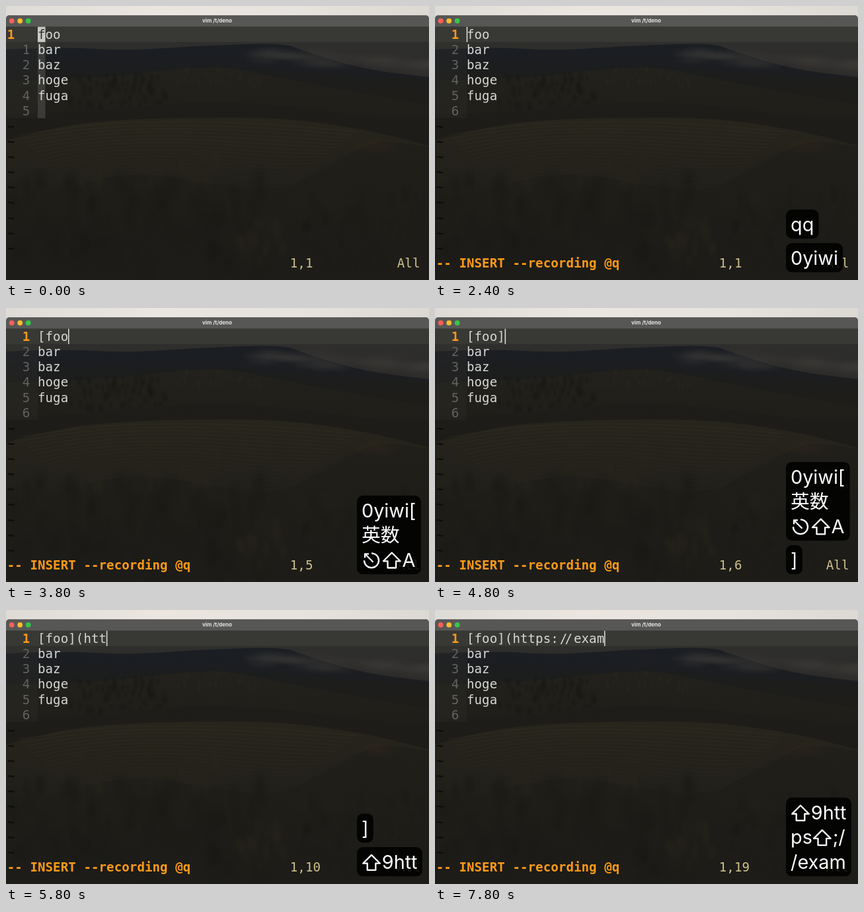
Animation, 640 px wide and 416 px high, one loop 8000 ms. Source, as an HTML page with a canvas:

```html
<!DOCTYPE html>
<html lang="en">
<head>
<meta charset="utf-8">
<title>Macro recording</title>
<style>
html, body { margin: 0; width: 100%; height: 100%; overflow: hidden; background: #20201c; }
canvas { display: block; width: 100%; height: 100%; }
</style>
</head>
<body>
<canvas id="stage" width="640" height="416"></canvas>
<script>
const W = 640, H = 416, LOOP = 8000, STEP = 200;
const ctx = document.getElementById('stage').getContext('2d');

const MONO = '"DejaVu Sans Mono", monospace';
const SANS = 'Inter, "Noto Sans CJK JP", "Noto Sans CJK", sans-serif';
const ORANGE = '#fd9a18', TEXT = '#d6d6d4', DIM = '#62625f', TAN = '#cfc08c';
const CELL = 11.57, ROW = 23.13;
const colX = c => 1.7 + c * CELL;
const rowY = r => 31.6 + r * ROW;

// [time, mode, status, first line, cursor column]
const states = [
  [0, 'n', '', 'foo', 0],
  [1000, 'n', 'recording @q', 'foo', 0],
  [2400, 'i', '', 'foo', 0],
  [2600, 'i', '', '[foo', 1],
  [3200, 'n', 'recording @q', '[foo', 0],
  [3800, 'i', '', '[foo', 4]
];
// characters typed at the end of the line
const typed = [[4600, ']'], [5000, '('], [5400, 'h'], [5600, 't'], [5800, 't'], [6000, 'p'],
  [6200, 's'], [6600, ':'], [6800, '/'], [7200, '/'], [7400, 'e'], [7600, 'xa'], [7800, 'm']];

// key groups in the overlay
const groups = [
  { fade: 2490, keys: [[200, 'q'], [1000, 'q']] },
  { fade: 5290, keys: [[1600, '0'], [1800, 'yi'], [2000, 'w'], [2400, 'i'], [2600, '['],
    [3000, '\n英数'], [3200, '⎋'], [3600, '⇧'], [3800, 'A']] },
  { fade: 5890, keys: [[4600, ']']] },
  { fade: Infinity, keys: [[5000, '⇧9'], [5400, 'h'], [5600, 't'], [5800, 't'], [6000, '\np'],
    [6200, 's'], [6600, '⇧;'], [6800, '/'], [7200, '\n/'], [7400, 'e'], [7600, 'xa'], [7800, 'm']] }
];

const upTo = (list, t) => list.filter(k => k[0] <= t).map(k => k[1]).join('');

function random(seed) {
  return () => (seed = (seed * 16807) % 2147483647) / 2147483647;
}

function box(c, x, y, w, h, r, fill) {
  c.fillStyle = fill;
  c.beginPath();
  c.roundRect(x, y, w, h, r);
  c.fill();
}

function paintScene() {
  const cv = document.createElement('canvas');
  cv.width = W;
  cv.height = H;
  const c = cv.getContext('2d'), rnd = random(77);

  const trace = pts => {
    c.moveTo(...pts[0]);
    for (let i = 1; i < pts.length - 1; i++) {
      const [x, y] = pts[i], [u, v] = pts[i + 1];
      c.quadraticCurveTo(x, y, (x + u) / 2, (y + v) / 2);
    }
    c.lineTo(...pts[pts.length - 1]);
  };
  const hill = (pts, top, bottom, depth) => {
    const y = Math.min(...pts.map(p => p[1]));
    const g = c.createLinearGradient(0, y, 0, y + depth);
    g.addColorStop(0, top);
    g.addColorStop(1, bottom);
    c.fillStyle = g;
    c.beginPath();
    trace(pts);
    c.lineTo(W, H);
    c.lineTo(0, H);
    c.fill();
  };
  const glow = (x, y, rx, ry, color, a) => {
    c.save();
    c.translate(x, y);
    c.scale(rx, ry);
    const g = c.createRadialGradient(0, 0, 0, 0, 0, 1);
    g.addColorStop(0, `rgba(${color},${a})`);
    g.addColorStop(1, `rgba(${color},0)`);
    c.fillStyle = g;
    c.fillRect(-1, -1, 2, 2);
    c.restore();
  };
  // soft crowns scattered over a box
  const trees = (n, x, y, w, h, size, color, a) => {
    for (let i = 0; i < n; i++) {
      const s = size * (.5 + rnd() * .6);
      glow(x + rnd() * w, y + rnd() * h, s * .55, s, color, a);
    }
  };

  const sky = c.createLinearGradient(0, 31, 0, 120);
  sky.addColorStop(0, '#30302e');
  sky.addColorStop(1, '#2b2a29');
  c.fillStyle = sky;
  c.fillRect(0, 0, W, H);

  hill([[0, 66], [90, 62], [180, 68], [300, 60], [420, 56], [450, 68], [540, 96], [640, 108]], '#1b1e23', '#1c1d1f', 60);
  hill([[0, 86], [110, 78], [220, 92], [330, 88], [430, 98], [540, 106], [640, 112]], '#1b1d1f', '#1e1d1a', 60);
  for (let i = 0; i < 26; i++) {
    const u = rnd();
    glow(390 + u * 250, 84 + u * 14 - rnd() * 16, 25 + rnd() * 30, 6 + rnd() * 6, '62,60,57', .28);
  }
  hill([[0, 114], [140, 110], [250, 96], [330, 91], [400, 106], [500, 126], [640, 150]], '#22211c', '#1f1e1a', 80);
  trees(60, 95, 105, 150, 50, 11, '22,22,18', .5);
  trees(25, 255, 97, 130, 25, 7, '44,41,28', .35);
  hill([[0, 165], [150, 160], [280, 143], [420, 150], [540, 168], [640, 170]], '#1e1d19', '#1d1c18', 60);

  hill([[0, 204], [80, 182], [180, 172], [300, 169], [420, 170], [520, 184], [575, 195], [640, 212]], '#27251c', '#1f1e19', 130);
  c.lineWidth = .8;
  for (let i = 0; i < 17; i++) {
    const y = 176 + i * 5.2;
    c.strokeStyle = `rgba(67,60,42,${.38 - i * .016})`;
    c.beginPath();
    trace([[20 + i * 5, y + 20], [130, y + 2], [270, y - 1], [400, y + 3 + i], [530 - i * 6, y + 15 - i * .4]]);
    c.stroke();
  }
  hill([[0, 300], [90, 274], [200, 250], [300, 268], [410, 285], [480, 244], [560, 202], [640, 214]], '#201f1a', '#1d1c18', 160);
  c.strokeStyle = 'rgba(66,56,38,.25)';
  c.beginPath();
  trace([[408, 286], [440, 264], [500, 238], [545, 210], [572, 196]]);
  c.stroke();
  glow(562, 213, 38, 14, '60,42,28', .3);
  glow(470, 295, 50, 20, '48,40,26', .2);
  trees(45, 110, 210, 210, 65, 20, '40,37,25', .3);
  trees(70, 0, 265, 400, 140, 32, '22,22,18', .3);
  trees(20, 350, 325, 70, 65, 22, '44,39,28', .25);
  trees(40, 440, 280, 200, 120, 20, '24,23,19', .3);

  // desktop strip and window frame
  const top = c.createLinearGradient(0, 0, W, 0);
  top.addColorStop(0, '#dedbd6');
  top.addColorStop(.35, '#ebe6df');
  top.addColorStop(.7, '#e6e2dc');
  top.addColorStop(1, '#dcd9d3');
  c.fillStyle = top;
  c.fillRect(0, 0, W, 20);
  box(c, 0, 14, W, 17.5, [5, 5, 0, 0], '#575756');
  c.fillStyle = '#6b6b69';
  c.fillRect(5, 14, W - 10, .7);
  ['#ff5f57', '#febc2e', '#35c648'].forEach((color, i) => {
    c.fillStyle = color;
    c.beginPath();
    c.arc(8.7 + i * 12.5, 22.6, 3.9, 0, 7);
    c.fill();
  });
  c.font = `700 8px ${SANS}`;
  c.textAlign = 'center';
  c.fillStyle = '#e6e6e5';
  c.fillText('vim /t/deno', 319.5, 25.3);

  // cursor line and number column
  c.fillStyle = 'rgba(58,58,55,.85)';
  c.fillRect(0, 31.5, W, 23.2);
  c.fillStyle = 'rgba(56,56,54,.2)';
  c.fillRect(0, 54.7, 48, ROW * 5);
  return cv;
}

function put(str, col, row, color, bold) {
  ctx.font = `${bold ? 700 : 400} 19.1px ${MONO}`;
  ctx.fillStyle = color;
  const pair = str.indexOf('//');
  [...str].forEach((ch, i) => {
    const nudge = pair < 0 ? 0 : i === pair ? 2 : i === pair + 1 ? -2 : 0;
    ctx.fillText(ch, colX(col + i) + nudge, rowY(row) + 18.4);
  });
}

function drawEditor(t) {
  const [, mode, status, base, pos] = states.filter(s => s[0] <= t).pop();
  const extra = upTo(typed, t), insert = mode === 'i';
  const line = base + extra, cur = pos + extra.length, x = colX(4 + cur);

  if (!insert) {
    ctx.fillStyle = 'rgba(72,72,69,.7)';
    ctx.fillRect(x, rowY(1), CELL, ROW * 5);
  }
  put('1', insert ? 2 : 0, 0, ORANGE, true);
  [line, 'bar', 'baz', 'hoge', 'fuga', ''].forEach((str, r) => {
    if (r) put(String(insert ? r + 1 : r), 2, r, DIM);
    put(str, 4, r, TEXT);
  });
  for (let r = 6; r < 15; r++) put('~', 0, r, '#0d0d0c', true);

  if (insert) {
    ctx.fillStyle = '#d8d8d5';
    ctx.fillRect(x - .3, rowY(0), 1.6, ROW);
  } else {
    ctx.fillStyle = '#c9c9c6';
    ctx.fillRect(x, rowY(0), CELL, ROW);
    put(line[cur], 4 + cur, 0, '#2c2c2a');
  }
  put(insert ? '-- INSERT --recording @q' : status, 0, 15, ORANGE, true);
  put(`1,${cur + 1}`, 37, 15, TAN);
  put('All', 51, 15, TAN);
}

// key symbols, drawn around their centre
const icons = {
  '⇧'() {
    ctx.moveTo(0, -11.8);
    [[12.8, 1], [6.3, 1], [6.3, 11.2], [-6.3, 11.2], [-6.3, 1], [-12.8, 1]].forEach(p => ctx.lineTo(...p));
    ctx.closePath();
  },
  '⎋'() {
    ctx.arc(0, 0, 11, -Math.PI * .5, Math.PI);
    ctx.moveTo(2.5, 2.5);
    ctx.lineTo(-9.5, -9.5);
    ctx.moveTo(-10, -4);
    ctx.lineTo(-10, -10);
    ctx.lineTo(-4, -10);
  }
};
const ICON_W = 30.8;
const parts = str => str.match(/[⎋⇧]|[^⎋⇧]+/g) || [];
const partWidth = s => icons[s] ? ICON_W : ctx.measureText(s).width;

function drawKeys(str, x, y) {
  for (const s of parts(str)) {
    if (icons[s]) {
      ctx.save();
      ctx.translate(x + 15, y - 9.5);
      ctx.beginPath();
      icons[s]();
      ctx.stroke();
      ctx.restore();
    } else {
      ctx.fillText(s, x, y);
    }
    x += partWidth(s);
  }
}

function drawOverlay(t) {
  let bottom = 404.3;
  ctx.font = `400 28.8px ${SANS}`;
  ctx.strokeStyle = '#fff';
  ctx.lineWidth = 2.3;
  ctx.lineJoin = 'round';
  for (const g of [...groups].reverse()) {
    // the escape key moves down once shift no longer fits beside it
    const str = upTo(g.keys, t).replace('⎋⇧', '\n⎋⇧');
    const alpha = Math.min(1, 1 - (t - g.fade) / 190);
    if (!str || alpha <= 0) continue;
    const lines = str.split('\n');
    const w = Math.max(...lines.map(l => parts(l).reduce((sum, s) => sum + partWidth(s), 0)));
    const h = 44.3 + 37.6 * (lines.length - 1);
    ctx.globalAlpha = alpha;
    box(ctx, 531, bottom - h, w + 14.3, h, 9, 'rgba(0,0,0,.87)');
    ctx.fillStyle = '#fff';
    lines.forEach((l, i) => drawKeys(l, 538, bottom - h + 33.2 + i * 37.4));
    ctx.globalAlpha = 1;
    bottom -= h + 6.8;
  }
}

const scene = paintScene();
const start = performance.now();

function frame() {
  const elapsed = (performance.now() - start) % LOOP;
  const t = Math.floor(elapsed / STEP) * STEP;
  ctx.drawImage(scene, 0, 0);
  drawEditor(t);
  drawOverlay(t);
  requestAnimationFrame(frame);
}
frame();
</script>
</body>
</html>
```
